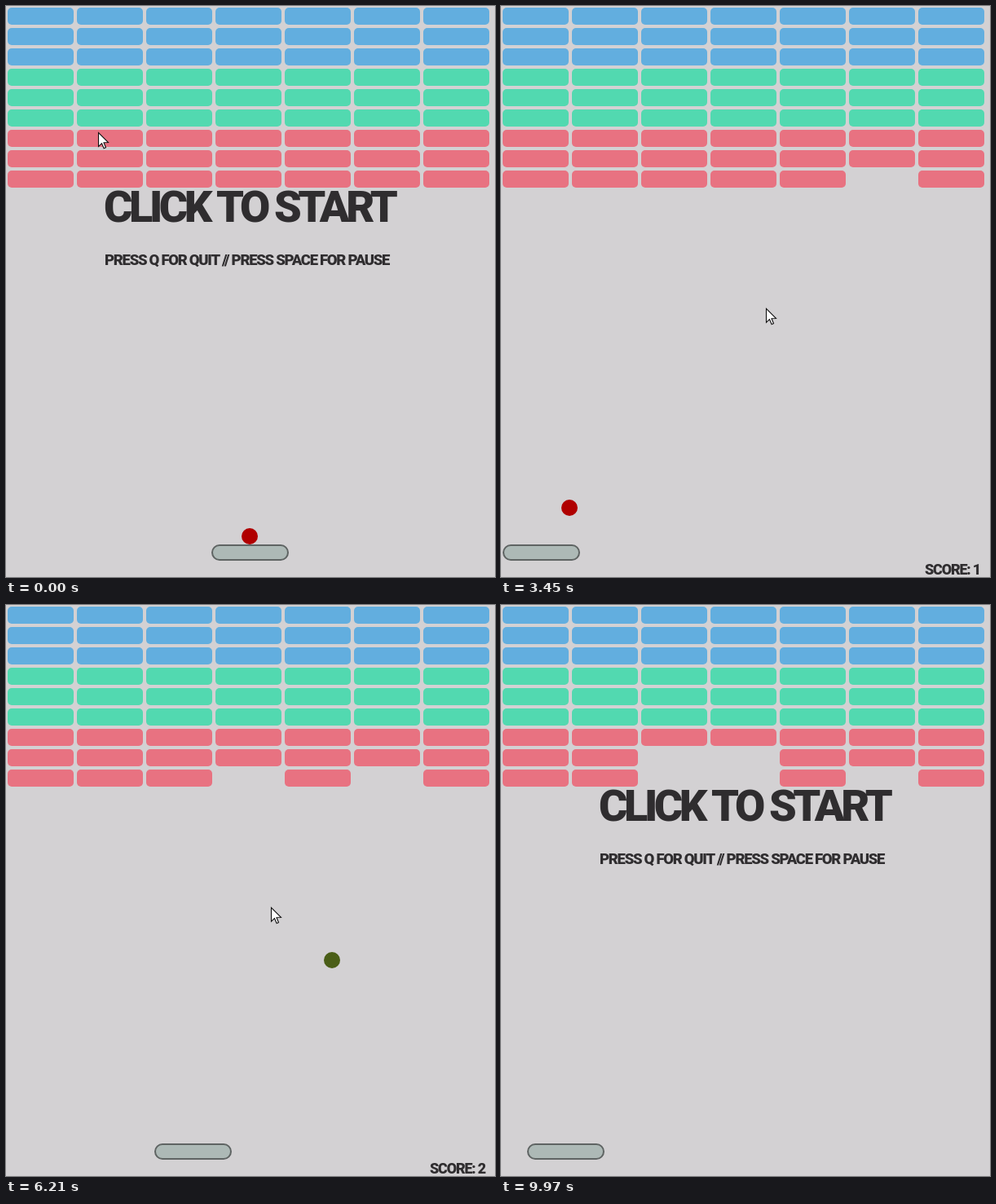
Animation of 600 by 701 pixels, one loop 10000 ms. Source, as an HTML page with a canvas:

```html
<!DOCTYPE html>
<html lang="en">
<head>
<meta charset="utf-8">
<title>Brick game</title>
<style>
  html, body { margin: 0; width: 100%; height: 100%; overflow: hidden; background: #d3d1d3; }
  canvas { display: block; }
</style>
</head>
<body>
<canvas id="stage" width="600" height="701"></canvas>
<script>
const ctx = document.getElementById('stage').getContext('2d');
const LOOP = 10000, FRAME = 1000 / 30;
const WIDTH = 600, HEIGHT = 701;
const COLS = 7, ROWS = 9, BRICK_W = 85, BRICK_H = 25;
const PADDLE_W = 95, PADDLE_H = 20, PADDLE_Y = 661, RADIUS = 10;
const ROW_COLORS = ['#62aedf', '#52d9b0', '#e87281'];
const BALL_COLORS = ['#b00000', '#1eb42a', '#4a5e17'];
const INK = '#2f2d2f';

// [video frame, game step]
const STEP_KEYS = [[42.5, 0], [62, 52], [103, 161], [130, 233], [186, 383], [225, 488], [240, 528]];
// [video frame, x, y]
const CURSOR_KEYS = [[0, 113, 155], [8, 101, 170], [28, 325, 371], [255, 325, 371], [265, 328, 657]];

const clamp = (v, lo, hi) => Math.min(hi, Math.max(lo, v));
const smooth = u => u * u * (3 - 2 * u);

function sample(keys, at, column, ease = u => u) {
  let i = 0;
  while (i < keys.length - 2 && at > keys[i + 1][0]) i++;
  const a = keys[i], b = keys[i + 1];
  const u = clamp((at - a[0]) / (b[0] - a[0]), 0, 1);
  return a[column] + (b[column] - a[column]) * ease(u);
}

function paddleX(step) {
  const left = clamp(step - 100, 0, 25) + clamp(step - 351, 0, 47);
  const right = clamp(step - 224, 0, 50);
  return 252 + 10 * (right - left);
}

function simulate() {
  const bricks = [], states = [];
  for (let row = 0; row < ROWS; row++)
    for (let col = 0; col < COLS; col++)
      bricks.push({ x: col * BRICK_W, y: row * BRICK_H, row, goneAt: Infinity });

  let x = 299, y = 651, vx = 5, vy = -5, hits = 0;
  const touches = (left, top, w, h) =>
    x + RADIUS > left && x - RADIUS < left + w && y + RADIUS > top && y - RADIUS < top + h;

  for (let step = 0; y + RADIUS <= HEIGHT; step++) {
    states.push({ x, y, color: BALL_COLORS[hits] });
    const struck = bricks.filter(b => b.goneAt === Infinity && touches(b.x, b.y, BRICK_W, BRICK_H));
    struck.forEach(b => b.goneAt = step + 1);
    if (struck.length) vy = -vy;
    if (x < RADIUS || x > WIDTH - RADIUS) vx = -vx;
    if (touches(paddleX(step), PADDLE_Y, PADDLE_W, PADDLE_H)) {
      if (vy > 0 && y + RADIUS - PADDLE_Y <= 5) {
        vy = -vy;
        vx -= Math.sign(vx);
        hits++;
      } else {
        vx = -vx;
      }
    }
    x += vx;
    y += vy;
  }
  return { bricks, states };
}

const { bricks, states } = simulate();

function text(str, x, y, size, spacing) {
  ctx.font = `900 ${size}px Roboto, Inter, sans-serif`;
  ctx.letterSpacing = spacing + 'px';
  ctx.fillStyle = INK;
  ctx.fillText(str, x, y);
}

function roundedBox(x, y, w, h, r) {
  ctx.beginPath();
  ctx.roundRect(x, y, w, h, r);
}

function drawPaddle(x) {
  roundedBox(x + 1, PADDLE_Y + 1, PADDLE_W - 2, PADDLE_H - 2, 9);
  ctx.fillStyle = '#adb9b6';
  ctx.fill();
  ctx.strokeStyle = '#5f6463';
  ctx.lineWidth = 2;
  ctx.stroke();
}

function drawBall({ x, y, color }) {
  ctx.beginPath();
  ctx.arc(x, y, RADIUS, 0, Math.PI * 2);
  ctx.fillStyle = color;
  ctx.fill();
}

function drawCursor(x, y) {
  const outline = [[0, 0], [0, 17], [4, 13.2], [6.6, 19.2], [9, 18.2], [6.5, 12.2], [12, 12]];
  ctx.beginPath();
  outline.forEach(([dx, dy]) => ctx.lineTo(x + dx + 0.5, y + dy + 0.5));
  ctx.closePath();
  ctx.fillStyle = '#fff';
  ctx.fill();
  ctx.strokeStyle = '#111';
  ctx.lineWidth = 1.1;
  ctx.stroke();
}

function draw(time) {
  const frame = Math.floor((time + 9) / FRAME);
  const step = Math.round(sample(STEP_KEYS, frame, 1));
  const over = step >= states.length;
  const playing = step > 0 && !over;

  ctx.fillStyle = '#d3d1d3';
  ctx.fillRect(0, 0, WIDTH, HEIGHT);

  if (!playing) {
    text('CLICK TO START', 120, 265, 54, -4.4);
    text('PRESS Q FOR QUIT // PRESS SPACE FOR PAUSE', 121, 318, 18.5, -1.28);
  }

  for (const b of bricks) {
    if (b.goneAt <= step) continue;
    roundedBox(b.x + 2, b.y + 2, BRICK_W - 4, BRICK_H - 4, 5);
    ctx.fillStyle = ROW_COLORS[Math.floor(b.row / 3)];
    ctx.fill();
  }

  drawPaddle(paddleX(step));
  if (!over) drawBall(states[step]);
  if (playing) {
    const score = bricks.filter(b => b.goneAt <= step).length;
    text('SCORE: ' + score, 520, 698, 18, -1.2);
  }
  if (frame <= 265)
    drawCursor(sample(CURSOR_KEYS, frame, 1, smooth), sample(CURSOR_KEYS, frame, 2, smooth));
}

const start = performance.now();
function tick() {
  draw((performance.now() - start) % LOOP);
  requestAnimationFrame(tick);
}
tick();
</script>
</body>
</html>
```
